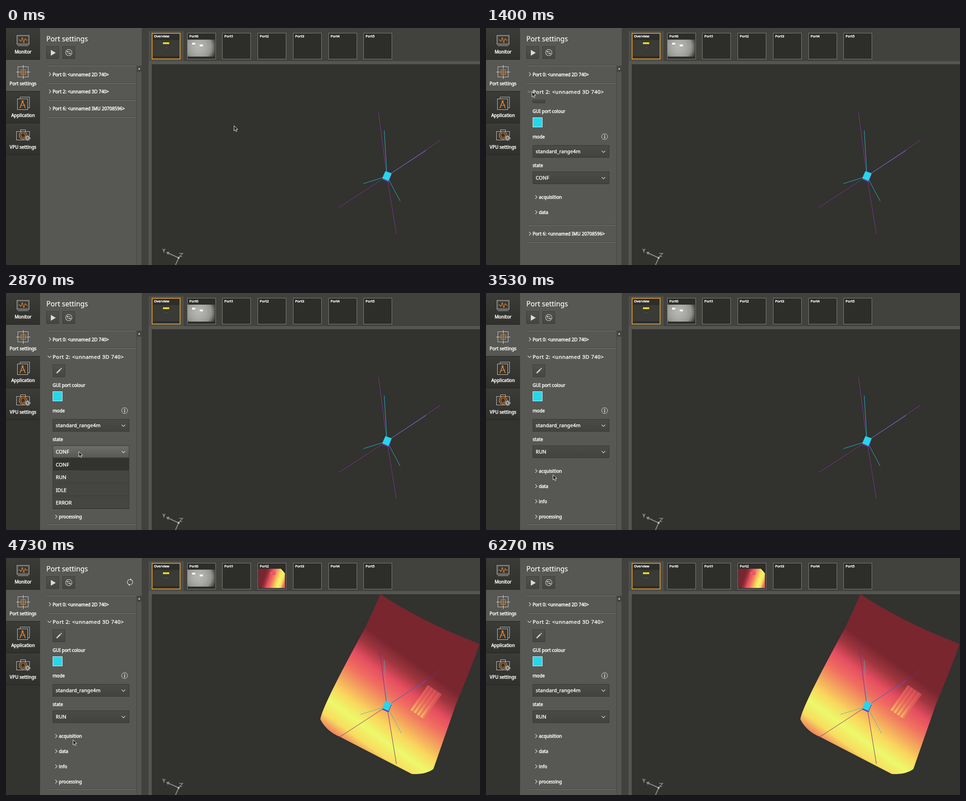
Write an HTML page with a canvas that moves like this. It is 1057x530 px and loops after 6390 ms.

```html
<!DOCTYPE html>
<html lang="en">
<head>
<meta charset="utf-8">
<title>Port settings</title>
<style>
html, body { margin: 0; width: 100%; height: 100%; overflow: hidden; background: #32322e; }
canvas { display: block; width: 1057px; height: 530px; }
</style>
</head>
<body>
<canvas id="stage" width="1057" height="530"></canvas>
<script>
const g = document.getElementById('stage').getContext('2d');
const LOOP = 6390, STEP = 200 / 3, TURN = Math.PI * 2;
const DARK = '#32322e', BAR = '#41423e', PANEL = '#575853';
const CYAN = '#26d7ea', ORANGE = '#ee8a2c', GREY = '#c6c6c2', ICON = '#dcdcd8';
const HEAT = ['#79262f', '#a0363f', '#e64e60', '#f06e60', '#f4a25e', '#f9d75d', '#ecf96a', '#f8dc5f', '#ee6a60'];

// Pointer stops: arrival, place, length of the move
const STOPS = [
  { at: 0, x: 508, y: 218 },
  { at: 533, x: 158, y: 167 },
  { at: 733, x: 123, y: 143 },
  { at: 1000, x: 102, y: 142 },
  { at: 1933, x: 150, y: 227 },
  { at: 2467, x: 162, y: 354, span: 400 },
  { at: 3133, x: 149, y: 406 },
  { at: 5533, x: 147, y: 402 },
  { at: 6200, x: 27, y: 0, span: 600 }
];

const clamp = k => Math.min(1, Math.max(0, k));
const mix = (a, b, k) => a + (b - a) * k;
const smooth = k => k * k * (3 - 2 * k);
const inOut = k => k < .5 ? 2 * k * k : 1 - 2 * (1 - k) ** 2;

function ramp(x0, y0, x1, y1, colors) {
  const r = g.createLinearGradient(x0, y0, x1, y1);
  colors.forEach((c, i) => r.addColorStop(i / (colors.length - 1), c));
  return r;
}

function box(x, y, w, h, fill, border, width = 1) {
  if (fill) { g.fillStyle = fill; g.fillRect(x, y, w, h); }
  if (border) {
    g.strokeStyle = border;
    g.lineWidth = width;
    g.strokeRect(x + width / 2, y + width / 2, w - width, h - width);
  }
}

function trace(points) {
  g.beginPath();
  points.forEach(([x, y]) => g.lineTo(x, y));
}

function line(points, color, width = 1) {
  trace(points);
  g.strokeStyle = color;
  g.lineWidth = width;
  g.stroke();
}

function poly(points, fill) {
  trace(points);
  g.fillStyle = fill;
  g.fill();
}

function ring(x, y, r, color, width = 1, from = 0, to = TURN) {
  g.beginPath();
  g.arc(x, y, r, from, to);
  g.strokeStyle = color;
  g.lineWidth = width;
  g.stroke();
}

function disc(x, y, r, fill) {
  g.beginPath();
  g.arc(x, y, r, 0, TURN);
  g.fillStyle = fill;
  g.fill();
}

// Triangle of radius r whose tip points along the angle
function arrow(x, y, r, angle, fill) {
  poly([0, 1, 2].map(i => {
    const a = angle + i * TURN / 3;
    return [x + r * Math.cos(a), y + r * Math.sin(a)];
  }), fill);
}

// y is the middle of the capitals
function text(str, x, y, size = 10, { bold = .55, gap = 0, align = 'left', color = '#fafaf8' } = {}) {
  g.font = `${size}px "Noto Sans", "Open Sans", sans-serif`;
  g.letterSpacing = gap + 'px';
  g.textAlign = align;
  g.fillStyle = g.strokeStyle = color;
  g.lineWidth = bold;
  g.lineJoin = 'round';
  g.fillText(str, x, y + size * .36);
  g.strokeText(str, x, y + size * .36);
  g.lineJoin = 'miter';
}

function chevron(x, y, down, color = ICON) {
  line(down ? [[x - 4, y - 2], [x, y + 2], [x + 4, y - 2]] : [[x, y - 4], [x + 4, y], [x, y + 4]], color, 1.1);
}

function rule(y) {
  box(90, y - 1, 201, 1, '#41423e');
  box(90, y, 201, 1, '#7a7b77');
}

function monitorIcon() {
  box(24, 16, 28, 21, null, GREY);
  box(26, 18, 24, 17, null, '#72726e');
  const pulse = Array.from({ length: 21 }, (_, i) => {
    const u = (i - 10) / 10;
    return [38 + 10 * u, 27 + 6 * Math.sin(u * 9) * (1 - u * u) ** 2];
  });
  line(pulse, ORANGE, 1.2);
  box(26, 39, 24, 1, GREY);
}

function portIcon() {
  box(26, 86, 24, 24, null, GREY);
  box(33, 93, 11, 11, null, ORANGE);
  for (const [reach, color] of [[15, ICON], [8, ORANGE]]) {
    box(38, 98 - reach, 1, reach * 2 + 1, color);
    box(38 - reach, 98, reach * 2 + 1, 1, color);
  }
}

function applicationIcon() {
  line([[31.5, 158], [31.5, 154.5], [52.5, 154.5], [52.5, 178.5], [49, 178.5]], GREY);
  box(25, 158, 24, 25, null, GREY);
  line([[31, 179], [37, 164], [43, 179]], ORANGE, 1.7);
  line([[32, 174], [43, 172]], ORANGE, 1.2);
  disc(37, 164, 2, ORANGE);
}

function cameraIcon() {
  box(23, 231, 30, 20, null, GREY);
  box(32, 227, 12, 5, '#363633', GREY);
  disc(38, 240, 9, '#343431');
  ring(38, 240, 8.5, ORANGE, 1.5);
  ring(38, 240, 5, ORANGE, 1.2);
  disc(48, 246, 7, '#343431');
  g.setLineDash([2, 1.9]);
  ring(48, 246, 5.4, GREY, 2);
  g.setLineDash([]);
  disc(48, 246, 4.6, '#a9a9a5');
  disc(48, 246, 1.8, '#4b4b47');
}

function sidebar() {
  box(0, 0, 76, 530, '#333330');
  ['Monitor', 'Port settings', 'Application', 'VPU settings'].forEach((name, i) => {
    const y = i * 71;
    box(0, y, 76, 70, i === 1 ? PANEL : ramp(0, y, 0, y + 70, ['#3b3b38', '#30302d']));
    box(0, y + 70, 76, 1, '#242421');
    text(name, 38, y + 53, 10, { align: 'center' });
  });
  monitorIcon();
  portIcon();
  applicationIcon();
  cameraIcon();
}

function toolButton(x, y) {
  box(x, y, 28, 28, ramp(0, y, 0, y + 28, ['#50514c', '#454641']), '#3a3b37');
}

function toolbar() {
  text('Port settings', 90, 24, 15.5, { bold: .2 });
  toolButton(90, 41);
  poly([[100, 49], [100, 62], [111, 55.5]], ICON);
  toolButton(126, 41);
  ring(140, 55, 7, ICON, 1.1);
  for (const s of [-1, 1]) {
    box(137, 55 + 2 * s - .5, 6, 1, ICON);
    arrow(140 + 3 * s, 55 + 2 * s, 2.2, s > 0 ? 0 : Math.PI, ICON);
  }
}

function combo(y, label, lit) {
  box(104, y, 171, 28, ramp(0, y, 0, y + 28, lit ? ['#6e6f6b', '#575853'] : ['#4a4b46', '#42433f']), '#363732');
  text(label, 111, y + 14.5, 11, { bold: .45, gap: .12 });
  chevron(262, y + 14.5, true);
}

function portContent(s) {
  toolButton(104, 160);
  line([[113, 179], [121.5, 170.5]], ICON, 2.6);
  line([[122.3, 169.7], [123.8, 168.2]], ICON, 2.6);
  text('GUI port colour', 104, 206);
  box(104, 220, 22, 22, CYAN);
  g.setLineDash([3, 1]);
  box(104, 220, 22, 22, null, '#ffffff');
  g.setLineDash([]);
  text('mode', 104, 263.5);
  ring(264.5, 263, 6.6, ICON);
  box(263.5, 262, 2, 5, ICON);
  box(263.5, 259, 2, 2, ICON);
  combo(282, 'standard_range4m', s.over(282));
  text('state', 104, 327.5);
  combo(341, s.t < 3530 ? 'CONF' : 'RUN', s.over(341) || (s.t > 5460 && s.t < 5660));
  ['acquisition', 'data', 'info', 'processing'].forEach((name, i) => {
    chevron(110, 398 + i * 34);
    text(name, 118, 398 + i * 34);
  });
}

function dropdown(s) {
  const hot = s.y > 397 ? 1 : 0;
  ['CONF', 'RUN', 'IDLE', 'ERROR'].forEach((name, i) => {
    const y = 369 + i * 28.3;
    box(104, y, 171, 28.3, i === hot ? DARK : '#454641');
    box(104, y + 27.5, 171, 1, '#383934');
    text(name, 111, y + 15, 11, { bold: .45, gap: .1 });
  });
  box(104, 369, 171, 114, null, '#363732');
}

function spinner(t) {
  g.save();
  g.translate(276.5, 54);
  g.rotate(t / 1000 * TURN);
  for (let i = 0; i < 2; i++) {
    ring(0, 0, 6, ICON, 1.2, .35, 2.9);
    arrow(6, 1.6, 2.6, -Math.PI / 2, ICON);
    g.rotate(Math.PI);
  }
  g.restore();
}

function panel(s) {
  box(76, 0, 228, 530, PANEL);
  toolbar();
  box(291, 84, 12, 446, '#454641');
  box(292, 98, 10, 432, '#555651');
  arrow(297, 91.5, 2.6, -Math.PI / 2, ICON);
  box(303, 0, 1, 530, '#3a3b37');

  rule(84);
  chevron(96, 103.5);
  text('Port 0: <unnamed 2D 740>', 104, 104);
  rule(123);
  const open = inOut(clamp((s.t - 1130) / 400));
  const bottom = Math.floor(161 + 356 * open);
  const title = 'Port 2: <unnamed 3D 740>';
  if (open) {
    chevron(97, 142.5, true, s.t > 1700 ? ICON : '#94948f');
    text(title, 104, 142.5, 11.5, { bold: .45, gap: .62 });
    g.save();
    g.beginPath();
    g.rect(90, 160, 200, bottom - 160);
    g.clip();
    g.translate(0, -Math.round(94 * (1 - open)));
    portContent(s);
    g.restore();
  } else {
    chevron(96, 142);
    text(title, 104, 142.5);
  }
  rule(bottom);
  chevron(96, bottom + 19);
  text('Port 6: <unnamed IMU 20708596>', 104, bottom + 19.5);
  rule(bottom + 38);
  if (s.t > 2520 && s.t < 3520) dropdown(s);
  if (s.t > 4060 && s.t < 5390) spinner(s.t);
}

function roomView() {
  const glow = g.createRadialGradient(430, 42, 4, 430, 42, 40);
  ['#b4b5b2', '#a9aaa6', '#94958f', '#3a3a35'].forEach((c, i) => glow.addColorStop(i / 3, c));
  box(405, 26, 61, 38, glow);
  box(415, 33, 7, 4, '#ffffff');
  box(432, 37, 7, 4, '#ffffff');
}

function depthView(x, late) {
  const from = x + (late ? 17 : 13);
  box(x + 2, 24, 59, 43, ramp(from, 38, from + 44, 53, HEAT));
  box(x + 28, 31, 12, 7, '#e85a66');
  if (late) poly([[x + 52, 24], [x + 61, 24], [x + 61, 34]], '#33251f');
}

function tabs(s) {
  box(304, 0, 753, 81, BAR);
  box(304, 81, 14, 449, BAR);
  box(318, 7, 78, 67, '#4e4f4a');
  box(318, 74, 739, 7, '#555651');
  box(318, 81, 7, 449, '#555651');
  ['Overview', ...Array.from({ length: 6 }, (_, i) => 'Port' + i)].forEach((name, i) => {
    const x = Math.round(325 + 78.7 * i);
    box(x, 11, 64, 59, '#2d2d2a');
    if (i === 0) {
      box(x + 2, 27, 60, 36, '#3a3a36');
      box(350, 32, 14, 4, '#e6dc28');
      ring(358, 47, 3, '#64646a', 1, 3.6, 5.6);
    }
    if (i === 1 && s.t < 5060) roomView();
    if (i === 3 && s.t > 4060) depthView(x, s.t > 4390);
    box(x, 11, 64, 59, null, i ? '#80817c' : '#f2a42e', i ? 1 : 1.6);
    text(name, x + 5, 18, 7.8);
  });
}

function cloud(t) {
  const w = 1.5 * Math.sin(t * .037);
  g.fillStyle = ramp(916 - w, 239 + w, 774 - w, 434 + w, HEAT);
  g.fill(new Path2D('M835 81Q930 144 1056 192Q1040 240 1003 328L953 472Q935 485 905 483' +
    'L745 400Q715 388 701 361Q703 335 803 152Z'));
  // ribbed box, drawn as strips between its two short sides
  const ribs = 8;
  for (let i = 0; i < ribs; i++) {
    const edge = k => [[mix(941, 972, k), mix(284, 305, k)], [mix(902, 931, k), mix(340, 360, k)]];
    const [a, b] = edge(i / ribs), [c, d] = edge((i + 1) / ribs);
    poly([a, b, d, c], ramp(957, 294, 917, 350, i % 2 ? ['#c8444f', '#e2605a', '#ee8a5c'] : ['#d64e58', '#ee6a60', '#f8c45e']));
  }
}

function scene(s) {
  box(325, 81, 732, 449, DARK);
  const full = s.t > 4390;
  if (full) cloud(s.t);
  const spokes = (color, ends) => ends.forEach(end => line([[849.5, 331.5], end], color));
  spokes(full ? '#7d2a86' : '#8434a0', [[830.5, 188], [969, 250.5], [742, 401.5], [870.5, 460]]);
  spokes(full ? '#4fb4bd' : '#25b9cb', [[843.5, 229], full ? [790, 350] : [797, 348], full ? [882, 392] : [879, 387]]);
  line([[858, 325.5], [937, 273.5]], full ? '#4a76cc' : '#6c82dc');
  // sensor cube over its shadow
  const cube = [[846, 320], [860, 325], [853, 342], [839, 336]];
  poly(cube.map(([x, y]) => [x, y + 3]), '#7a2fa4');
  poly(cube, CYAN);
  // orientation marker
  const tone = '#8d8e8a';
  line([[378, 530], [385, 514], [362, 503.5]], tone, 2);
  arrow(361, 503, 4.5, Math.PI * 1.13, tone);
  line([[386, 504], [394, 504], [387, 511], [393, 511]], tone, 1.6);
  disc(385, 514, 2.2, '#c4c4c0');
  text('Y', 352, 498, 11, { color: '#a3a4a0', align: 'center' });
}

function pointer(x, y) {
  const shape = new Path2D('M.5 .5v11.5l2.7-2.5l1.8 4.2l2-.9l-1.7-4l3.6-.1z');
  g.save();
  g.translate(x, y);
  g.fillStyle = '#1d1d1b';
  g.strokeStyle = '#f0f0ee';
  g.lineWidth = 1;
  g.fill(shape);
  g.stroke(shape);
  g.restore();
}

function state(now) {
  const t = Math.floor((now % LOOP + 4) / STEP) * STEP;
  const i = Math.max(1, STOPS.findLastIndex(p => p.at <= t) + 1);
  const a = STOPS[i - 1], b = STOPS[i] || a;
  const begin = Math.max(a.at, b.at - (b.span || 267));
  const k = b === a ? 1 : smooth(clamp((t - begin) / (b.at - begin)));
  const x = Math.round(mix(a.x, b.x, k)), y = Math.round(mix(a.y, b.y, k));
  return { t, x, y, over: top => x > 104 && x < 275 && y > top && y < top + 28 };
}

function draw(now) {
  const s = state(now);
  scene(s);
  tabs(s);
  panel(s);
  sidebar();
  if (s.t < 6240) pointer(s.x, s.y);
}

const start = performance.now();
function tick() {
  draw(performance.now() - start);
  requestAnimationFrame(tick);
}
tick();
</script>
</body>
</html>
```
